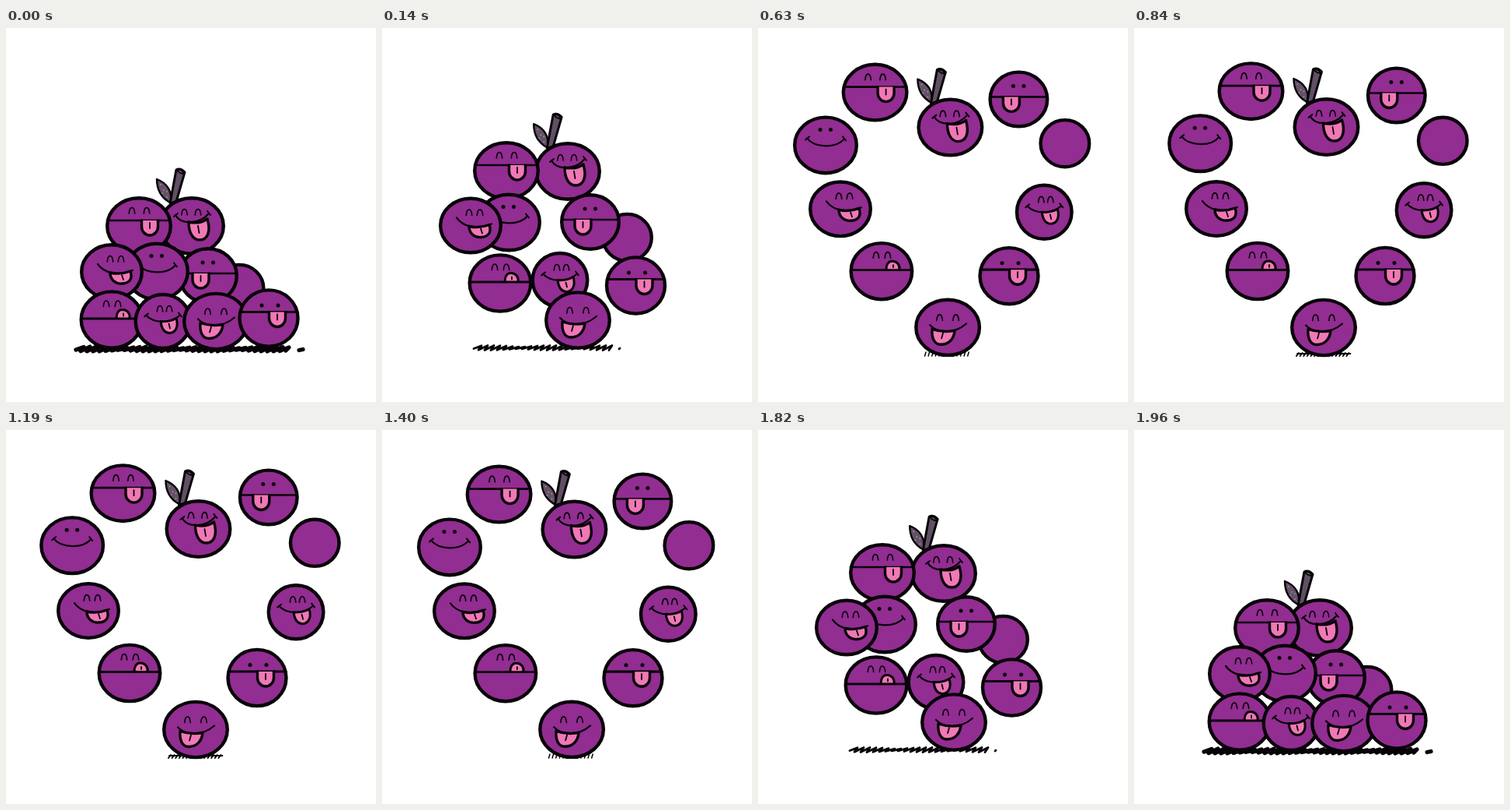
Recreate the animation shown at these times as an HTML page. Size 476 by 480 pixels, loop 2.1 s.

```html
<!DOCTYPE html>
<html lang="en">
<head>
<meta charset="utf-8">
<title>Bouncing grapes</title>
<style>
html, body { margin: 0; width: 100%; height: 100%; overflow: hidden; background: #fff; }
svg { display: block; width: 100%; height: 100%; }
</style>
</head>
<body>
<svg id="stage" viewBox="0 0 476 480" fill="none" stroke="#080308" stroke-linecap="round" stroke-linejoin="round"></svg>
<script>
const STEP = 70, STEPS = 30;
const SKIN = '#922d91', PINK = '#f078b6', INK = '#080308';
const stage = document.getElementById('stage');

function add(parent, tag, attrs) {
  const el = document.createElementNS('http://www.w3.org/2000/svg', tag);
  for (const key in attrs) el.setAttribute(key, attrs[key]);
  return parent.appendChild(el);
}

// Face parts, relative to the centre of a grape
const line = (d, w = 2.2) => `<path d="${d}" stroke-width="${w}"/>`;
const blob = (d, w = 3.4) => `<path d="${d}" fill="${PINK}" stroke-width="${w}"/>`;
const dots = (x1, x2, y) => [x1, x2].map(x =>
  `<circle cx="${x}" cy="${y}" r="2.5" fill="${INK}" stroke="none"/>`).join('');
const lids = (x1, x2, y) => [x1, x2].map(x =>
  line(`M${x - 3.7} ${y + 4}C${x - 3} ${y - 6} ${x + 3} ${y - 6} ${x + 3.7} ${y + 4}`, 1.7)).join('');
const cheeks = (x1, y1, x2, y2) => line(`M${x1 - 2} ${y1 + 2}l5 -4M${x2 + 2} ${y2 + 2}l-4 -5`, 2);
const flat = (x1, x2, y, w = 2.6) => line(`M${x1} ${y}H${x2}`, w);
const tongue = (x, y) =>
  blob(`M${x - 10.5} ${y}v8a10.5 11 0 0 0 21 0v-8`) + line(`M${x} ${y + 3}v7`, 1.8);

const ground = add(stage, 'path', {});
const grapes = [];

// Places: in the pile, on the way up, in the heart, at the widest heart
function grape(rx, ry, places, face, back = '') {
  const el = add(stage, 'g', {});
  el.innerHTML = (back && `<g>${back}</g>`) +
    `<ellipse rx="${rx - 2.2}" ry="${ry - 2.2}" fill="${SKIN}" stroke-width="4.4"/>` + face;
  grapes.push({ el, places, back: back && el.firstChild });
}

const stem =
  `<path d="M-25 -31L-17 -74Q-12 -77 -6 -71L-17 -33Z" fill="#605064" stroke-width="3"/>` +
  `<path d="M-16 -74Q-10 -75 -7 -69Q-13 -69 -16 -74Z" fill="#786a7b" stroke-width="2"/>` +
  `<path d="M-42 -62C-29 -57 -21 -46 -25 -32C-36 -38 -42 -48 -42 -62Z" fill="#655266" stroke-width="2.4"/>` +
  `<path d="M-37 -55v.1M-33 -48v.1M-35 -44v.1M-29 -46v.1M-29 -39v.1" stroke="#d8ccd8" stroke-width="1.3"/>`;

grape(43, 38, [[239, 254], [239, 184], [247, 130], [247.5, 127]],
  lids(-9.5, 8, -18) + blob('M-4 -5C-4 8 1 18 10 18C20 18 25 8 20 -9Q10 -2 -4 -5') +
  line('M-21 -14C-14 -1 10 -2 22 -16') + cheeks(-21, -14, 22, -16) + line('M8 0l1.5 9', 1.8), stem);

grape(43, 38, [[171, 254], [160, 183], [151, 89], [150.5, 81]],
  lids(-9, 10, -20) + flat(-37, 37, -7) + tongue(14, -7));

grape(33.5, 32.3, [[300, 334], [315.5, 269], [384.5, 163], [397.5, 144.5]], '');

grape(39, 37, [[260, 318], [268, 249], [325, 113], [338, 86]],
  dots(-7, 6.5, -17) + flat(-35, 36, -3) + tongue(-9.5, -3));

grape(42, 38, [[194, 312.5], [163, 249.5], [95, 160], [85, 148]],
  dots(-7, 6.5, -20) + line('M-24 -9C-14 4 14 4 24 -8') + cheeks(-24, -9, 24, -8));

grape(41, 37, [[136, 313], [114, 253.5], [106, 233.5], [106, 232]],
  lids(-2, 12, -17) + blob('M-2 1C-2 10 5 16 14 15C24 14 27 8 24 -1Q11 4 -2 1') +
  line('M-18 -10C-10 1 6 6 27 -2') + line('M13 4l2 6', 1.8));

grape(41.5, 38.3, [[136, 374.5], [152, 327.5], [158.5, 313], [159, 312]],
  lids(-7, 8, -21) + blob('M6 -2C6 -9 9 -13 14 -13C20 -13 24 -8 23 -2', 3) +
  flat(-37, 37, -1.5, 2.8) + line('M15 -8v3', 1.8));

grape(37.5, 36.7, [[202, 376.5], [229, 323.5], [347.5, 247.5], [373.5, 233.5]],
  lids(-4, 8, -16.5) + blob('M-3 0C-2 9 2 15 9 15C17 14 20 6 17 -4Q8 1 -3 0', 3) +
  line('M-22 -8C-12 3 10 3 22 -8') + cheeks(-22, -8, 22, -8) + line('M7.5 3l1.5 6', 1.8));

grape(43, 37.8, [[270, 376.5], [252, 375], [244.5, 383.5], [244, 384.5]],
  lids(-10.5, 10.5, -13) + blob('M-20 2C-21 14 -17 22 -9 22C1 22 8 15 9 4Q-6 7 -20 2') +
  line('M-23 -3C-14 7 8 9 24 -5') + line('M-6 7l-2 7', 1.8));

grape(39.7, 38.3, [[338, 372.5], [326.5, 330.5], [323, 319], [323, 318]],
  dots(-9, 12, -16.5) + flat(-36, 37, -8, 3.2) + tongue(11, -8));

// Smooth curve through values at steps 0, 2 and 5
function curve(a, b, c, s) {
  const k = (b - a) / 2, m = (c - b) / 3;
  return a + k * s + (m - k) / 5 * s * (s - 2);
}

function drawGround(s, slim) {
  const left = curve(90, 118, 209, s) + (slim ? 4 : 0);
  const right = curve(384, 308, 281, s) - (slim ? 6 : 0);
  const y = curve(412, 410.5, 418, s);
  let d = '';
  if (s === 5) {
    for (let x = left + 3; x < right; x += 4.6)
      d += slim ? `M${x} ${y - 2}l-1.5 5` : `M${x} ${y - 1}l-3 4m1 -3h4`;
  } else {
    const dot = s ? 3 : 7, end = right - dot * 3;
    d = `M${left} ${y + 1}`;
    for (let x = left, i = 0; x < end - 8; x += 8, i++) {
      const r = Math.abs(Math.sin(i * 12.9 + 1));
      d += `L${x + 10} ${y - 1 - 2 * r}L${x + 6} ${y + 1 + 2 * r}`;
    }
    d += `M${right - dot} ${y + 1.5}l${dot - 2} -1`;
  }
  ground.setAttribute('d', d);
  ground.setAttribute('stroke-width', s === 5 ? (slim ? 1.5 : 2) : curve(5.2, 2.8, 2, s));
}

function draw(ms) {
  const i = Math.floor(ms / STEP) % STEPS;
  const s = Math.max(0, Math.min(i, 5, 28 - i));
  const spread = i > 6 && i < 23 ? 1 - Math.pow(Math.abs(i - 14.5) / 9.17, 3.14) : 0;
  for (const { el, places: [pile, mid, heart, wide], back } of grapes) {
    const [x, y] = [0, 1].map(n =>
      curve(pile[n], mid[n], heart[n], s) + spread * (wide[n] - heart[n]));
    el.setAttribute('transform', `translate(${x.toFixed(2)} ${y.toFixed(2)})`);
    if (back) back.setAttribute('transform', `translate(${-3 + s * 0.6} ${2 - s * 0.4})`);
  }
  drawGround(s, i === 8 || i === 9 || i === 20 || i === 21);
}

const start = performance.now();
function tick() {
  draw(performance.now() - start);
  requestAnimationFrame(tick);
}
tick();
</script>
</body>
</html>
```
